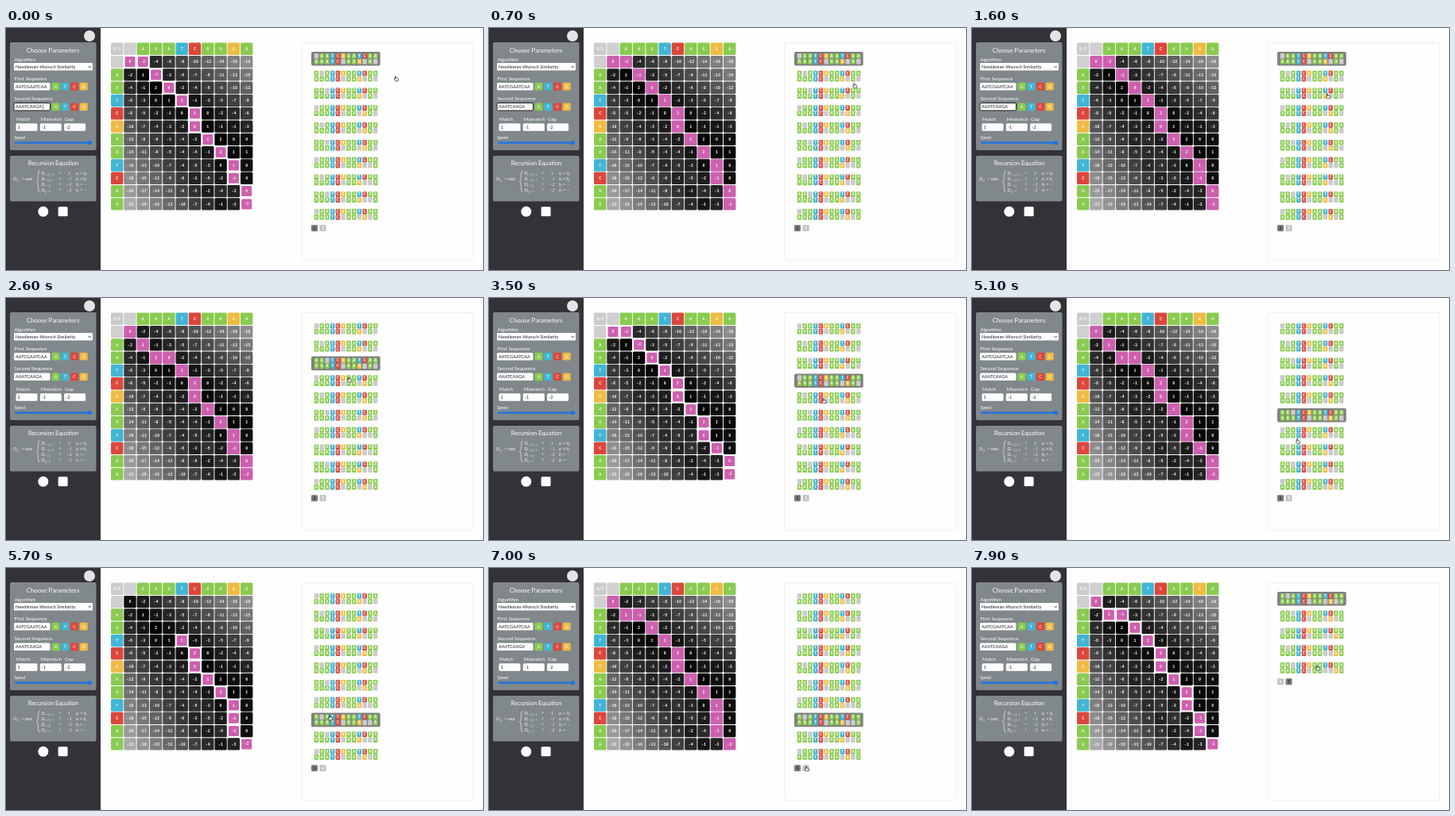
Write an HTML page with a canvas that moves like this. It is 600x305 px and loops after 8000 ms.

```html
<!DOCTYPE html>
<html lang="en">
<head>
<meta charset="utf-8">
<title>Sequence alignment</title>
<style>
html, body { margin: 0; width: 100%; height: 100%; overflow: hidden; background: #fefefe; }
canvas { display: block; width: 600px; height: 305px; }
</style>
</head>
<body>
<canvas id="stage"></canvas>
<script>
const canvas = document.getElementById('stage');
const ctx = canvas.getContext('2d');
const ratio = window.devicePixelRatio || 1;
canvas.width = 600 * ratio;
canvas.height = 305 * ratio;

const LOOP = 8000, STEP = 33, SETTLE = 700;
const FIRST = 'AATCGAATCAA', SECOND = 'AAATCAAGA';
const BASE = { A: '#89cb50', T: '#42b5d5', C: '#dc473b', G: '#efbb43', '-': '#cbcbcb' };
const PINK = '#cd60ae', CARD = '#80888b';
const SANS = 'Lato, sans-serif', MONO = '"Liberation Mono", monospace';
const SERIF = '"Liberation Serif", serif';

// Score matrix: match 1, mismatch -1, gap -2
const score = [];
for (let i = 0; i <= FIRST.length; i++) {
  score.push([]);
  for (let j = 0; j <= SECOND.length; j++) {
    score[i][j] = !i || !j ? -2 * (i + j) : Math.max(
      score[i - 1][j - 1] + (FIRST[i - 1] === SECOND[j - 1] ? 1 : -1),
      score[i - 1][j] - 2,
      score[i][j - 1] - 2);
  }
}

// Optimal paths differ only in their first and last few cells
const heads = [[[0, 1], [1, 2]], [[1, 1], [1, 2]], [[1, 1], [2, 2]]];
const tails = [[8, 8, 9], [7, 8, 9], [8, 8, 8], [7, 8, 8], [7, 7, 8]];
const paths = tails.flatMap(tail => heads.map(head => [
  [0, 0], ...head, [2, 3], [3, 4], [4, 5], [5, 5], [6, 6], [7, 7],
  ...tail.map((col, k) => [8 + k, col]), [11, 9]
]));

function align(path) {
  const rows = ['', ''];
  for (let k = 1; k < path.length; k++) {
    const [i, j] = path[k], [pi, pj] = path[k - 1];
    rows[0] += i > pi ? FIRST[pi] : '-';
    rows[1] += j > pj ? SECOND[pj] : '-';
  }
  return rows;
}
const alignments = paths.map(align);

// Highlight time, traceback start, alignment
const picks = [[-400, -500, 0], [1900, 1800, 2], [2950, 2850, 3],
  [4100, 4000, 5], [5500, 5400, 7], [7200, 7300, 10]];

// Pointer time, x, y
const pointer = [[0, 491, 64], [900, 456, 74], [1600, 448, 86], [1900, 446, 84],
  [2600, 432, 103], [3000, 430, 104], [3900, 416, 148], [4600, 415, 151],
  [5300, 409, 188], [5800, 408, 189], [6300, 404, 236], [6900, 400, 253],
  [7250, 400, 253], [7900, 435, 126], [8000, 435, 126]];

function box(x, y, w, h, fill, r = 1.5, stroke) {
  ctx.beginPath();
  ctx.roundRect(x, y, w, h, r);
  ctx.fillStyle = fill;
  ctx.fill();
  if (stroke) {
    ctx.strokeStyle = stroke;
    ctx.lineWidth = 1;
    ctx.stroke();
  }
}

function disc(x, y, r, fill) {
  ctx.beginPath();
  ctx.arc(x, y, r, 0, 7);
  ctx.fillStyle = fill;
  ctx.fill();
}

function label(str, x, y, size, { color = '#fff', font = SANS, style = '', align = 'left' } = {}) {
  ctx.font = `${style} ${size}px ${font}`;
  ctx.fillStyle = color;
  ctx.textAlign = align;
  ctx.textBaseline = 'middle';
  ctx.fillText(str, x, y);
}

const code = (str, x, y, size, color) =>
  label(str, x, y, size, { color, font: MONO, style: 'bold', align: 'center' });

function field(str, x, y, w, stroke) {
  box(x, y, w, 9.5, '#fff', 1.5, stroke);
  label(str, x + 2, y + 5.1, 5.6, { color: '#222' });
}

function equation() {
  const math = (str, x, y, size = 5.4) =>
    label(str, x, y, size, { font: SERIF, style: 'italic' });
  math('D', 9, 190.5);
  math('i,j', 13, 192, 3.8);
  math('= max', 19, 190.5);
  ctx.beginPath();
  ctx.moveTo(43, 180);
  ctx.quadraticCurveTo(40.5, 180, 40.5, 184);
  ctx.quadraticCurveTo(40.5, 193.5, 38.5, 193.5);
  ctx.quadraticCurveTo(40.5, 193.5, 40.5, 203);
  ctx.quadraticCurveTo(40.5, 207, 43, 207);
  ctx.strokeStyle = '#fff';
  ctx.lineWidth = 0.6;
  ctx.stroke();
  [['i−1,j−1', '1', 'aᵢ = bⱼ'], ['i−1,j−1', '−1', 'aᵢ ≠ bⱼ'],
   ['i−1,j', '−2', 'bⱼ = −'], ['i,j−1', '−2', 'aᵢ = −']].forEach(([sub, cost, rule], k) => {
    const y = 183.5 + 6.9 * k;
    math('D', 44.5, y);
    math(sub, 48.3, y + 1.3, 3.8);
    math('+', 66, y);
    math(cost, cost.length > 1 ? 76 : 78, y);
    math(rule, 88, y);
  });
}

function sidebar(t) {
  box(0, 0, 119, 305, '#333238', 0);
  disc(105, 10, 7, '#e4e4e4');
  box(5, 18, 108.5, 136, CARD, 2);
  box(5, 161, 108.5, 57.5, CARD, 2);
  label('Choose Parameters', 59, 28.5, 7.8, { align: 'center' });
  label('Algorithm', 10.5, 40.5, 6.1);
  box(10, 44, 99, 9.5, '#fff', 1);
  label('Needleman-Wunsch Similarity', 12, 49, 5.7, { color: '#222' });
  ctx.beginPath();
  ctx.moveTo(103.5, 48);
  ctx.lineTo(105.2, 49.7);
  ctx.lineTo(106.9, 48);
  ctx.strokeStyle = '#222';
  ctx.lineWidth = 0.9;
  ctx.stroke();

  const focused = t < 1800;
  label('First Sequence', 10.5, 64, 6.3);
  field(FIRST, 10, 69, 45.5);
  label('Second Sequence', 10.5, 89.5, 6.2);
  field(SECOND, 10, 94.5, 45.5, focused && '#222');
  if (focused && t % 1000 < 500) box(46.5, 96, 0.6, 6.5, '#222', 0);
  for (const y of [68.8, 94.5]) {
    [...'ATCG'].forEach((c, k) => {
      box(57.6 + 11.7 * k, y, 10, 9.7, BASE[c]);
      label(c, 62.6 + 11.7 * k, y + 5.1, 5.6, { align: 'center' });
    });
  }
  [['Match', '1'], ['Mismatch', '-1'], ['Gap', '-2']].forEach(([name, value], k) => {
    label(name, [13, 43.5, 74][k], 115, 6.2);
    field(value, 12.5 + 30.3 * k, 120.3, 27);
  });
  label('Speed', 10.5, 138.5, 5);
  box(11, 143.5, 96, 2.2, '#1a73e8', 1);
  disc(105.3, 144.6, 2.7, '#1a73e8');

  label('Recursion Equation', 59.5, 171, 7.5, { align: 'center' });
  equation();
  disc(46.8, 231.3, 6.5, '#fff');
  box(65.6, 225.3, 12, 12, '#fff', 1.5);
}

function cell(row, col, fill, str, inset = 0) {
  const x = 132 + 16.3 * col + inset, y = 18.6 + 16.3 * row + inset;
  const size = 15.4 - 2 * inset;
  box(x, y, size, size, fill);
  code(str, x + size / 2, y + size / 2 + 0.4, inset ? 4.6 : 5, '#f4f4f4');
}

function matrix(t) {
  const [, start, item] = picks.findLast(p => p[1] <= t);
  const age = t - start;
  const shown = Math.floor(age / STEP + 0.01);
  const lit = new Set(paths[item].slice(-Math.max(shown, 1)).map(String));
  const inset = age < SETTLE ? 1.2 : 0;
  cell(0, 0, '#cbcbcb', 'D/S');
  cell(0, 1, '#d0d0d0', '');
  cell(1, 0, '#d0d0d0', '');
  [...SECOND].forEach((c, k) => cell(0, k + 2, BASE[c], c));
  [...FIRST].forEach((c, k) => cell(k + 2, 0, BASE[c], c));
  score.forEach((row, i) => row.forEach((v, j) => {
    const g = 7 * (2 - v);
    if (lit.has(`${i},${j}`)) cell(i + 1, j + 1, PINK, v, inset);
    else cell(i + 1, j + 1, `rgb(${g},${g},${g})`, v);
  }));
}

function results(t) {
  box(372, 18.5, 216, 274.5, '#fefefe', 2, '#eeeeee');
  const item = picks.findLast(p => p[0] <= t)[2];
  const page = Math.floor(item / 10);
  const list = alignments.slice(page * 10, page * 10 + 10);
  list.forEach((rows, n) => {
    const top = 30 + 21.8 * n;
    if (n === item % 10) box(384, top, 86.7, 17.6, '#808080', 2);
    rows.forEach((str, r) => [...str].forEach((c, k) => {
      const x = 387.7 + 6.75 * k, y = top + 1.9 + 7 * r;
      box(x, y, 5.5, 6.7, BASE[c], 1.2);
      if (c !== '-') code(c, x + 2.75, y + 3.6, 4.8, '#fff');
    }));
  });
  for (let k = 0; k < 2; k++) {
    const x = 384 + 10.6 * k, y = 30.2 + 21.8 * list.length;
    box(x, y, 8, 8, k === page ? '#777' : '#c2c2c2', 1.2);
    code(k + 1, x + 4, y + 4.3, 4.8, k === page ? '#222' : '#fff');
  }
}

function hand(t) {
  const k = pointer.findIndex(p => p[0] > t);
  const [t0, x0, y0] = pointer[k - 1], [t1, x1, y1] = pointer[k];
  const u = (t - t0) / (t1 - t0), s = u * u * (3 - 2 * u);
  ctx.save();
  ctx.translate(x0 + (x1 - x0) * s, y0 + (y1 - y0) * s);
  const shape = new Path2D('M-1.6-3 Q-1-3.6-.5-3 V-.9 L2-.5 Q2.8-.3 2.6.7 L2 2.9 H-1.1 L-3 .5 Q-2.8-.3-1.6.4Z');
  ctx.fillStyle = '#fff';
  ctx.fill(shape);
  ctx.strokeStyle = '#222';
  ctx.lineWidth = 0.7;
  ctx.stroke(shape);
  ctx.restore();
}

function frame(now) {
  const t = now % LOOP;
  ctx.setTransform(ratio, 0, 0, ratio, 0, 0);
  box(0, 0, 600, 305, '#fefefe', 0);
  sidebar(t);
  matrix(t);
  results(t);
  hand(t);
  requestAnimationFrame(frame);
}
requestAnimationFrame(frame);
</script>
</body>
</html>
```
